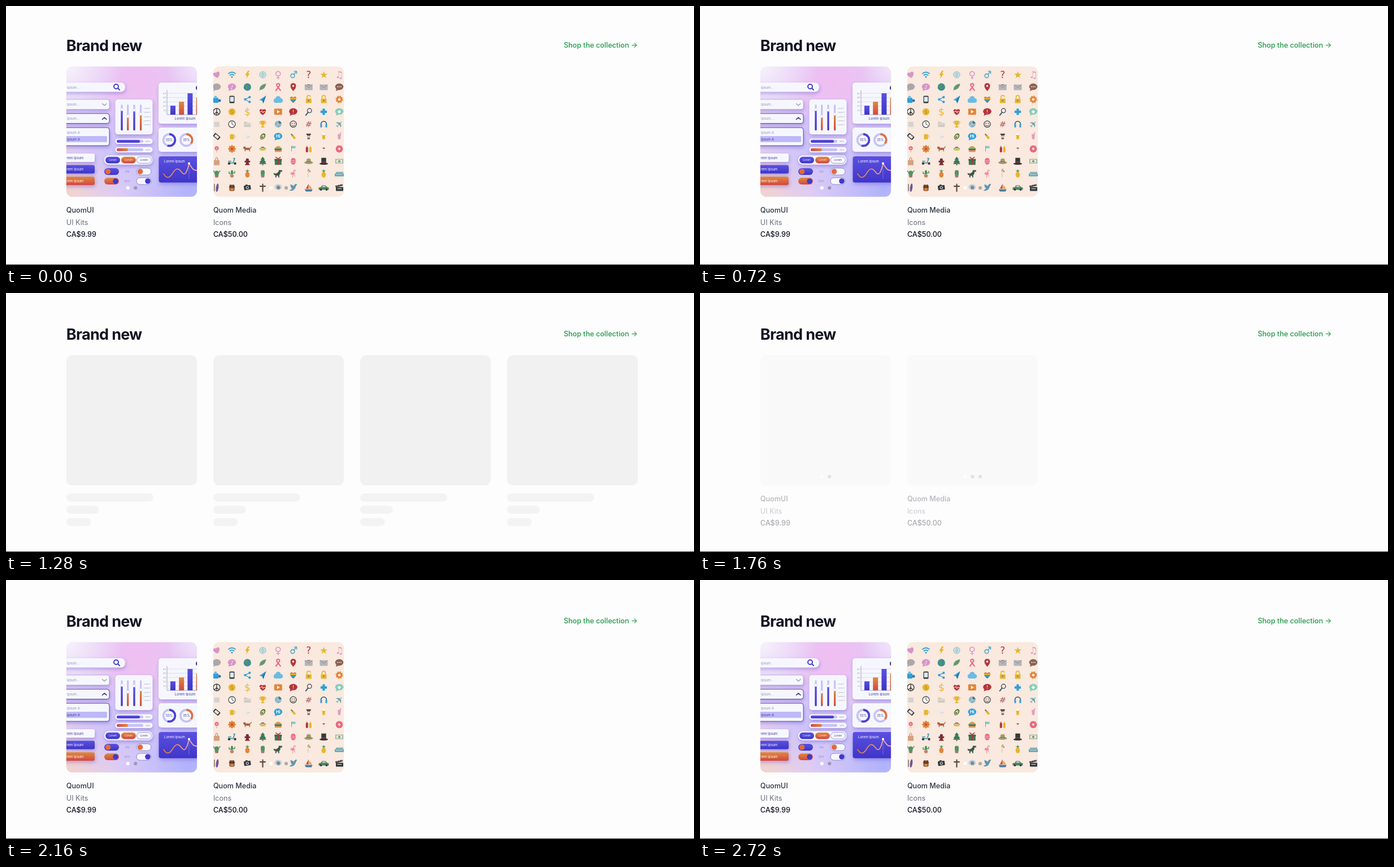
These frames come from a looping animation (1218 by 460 pixels, 2.8 s). An HTML page:

```html
<!DOCTYPE html>
<html lang="en">
<head>
<meta charset="utf-8">
<title>Brand new</title>
<style>
html, body { margin: 0; width: 100%; height: 100%; overflow: hidden; background: #fdfdfd; }
svg { display: block; width: 1218px; height: 460px; font-family: Inter, Roboto, sans-serif; }
#page, #bones, #cards, .photo { animation: 2800ms step-end infinite; }
#page { animation-name: shift; }
#bones { animation-name: wait; }
#cards { animation-name: appear; }
.photo { animation-name: load; }
@keyframes shift { 0% { transform: translateY(-3px); } 37.14%, 100% { transform: none; } }
@keyframes wait { 0% { opacity: 0; } 37.14% { opacity: 1; } 62.85%, 100% { opacity: 0; } }
@keyframes appear {
  0% { opacity: 1; } 37.14% { opacity: 0; } 62.85% { opacity: .35; }
  65.71% { opacity: .75; } 68.57%, 100% { opacity: 1; }
}
@keyframes load { 0% { opacity: 1; } 37.14% { opacity: 0; } 65.71%, 100% { opacity: 1; } }
.title { font-size: 27px; font-weight: 700; letter-spacing: -.025em; fill: #111322; }
.link, .info { font-size: 12.6px; font-weight: 500; }
.link { fill: #229a49; }
.lift > * { filter: drop-shadow(1px 3px 3px rgba(92, 72, 190, .38)); }
</style>
</head>
<body>
<svg id="stage" viewBox="0 0 1218 460"></svg>
<script>
const circ = (fill, r, x = 0, y = 0, ry = r) => `<ellipse cx="${x}" cy="${y}" rx="${r}" ry="${ry}" fill="${fill}"/>`;
const box = (fill, x, y, w, h, r = 0, more = '') =>
  `<rect x="${x}" y="${y}" width="${w}" height="${h}" rx="${r}" fill="${fill}" ${more}/>`;
const fig = (fill, d) => `<path d="${d}" fill="${fill}"/>`;
const line = (stroke, d, w = 1.2, more = '') =>
  `<path d="${d}" fill="none" stroke="${stroke}" stroke-width="${w}" stroke-linecap="round" stroke-linejoin="round" ${more}/>`;
const ring = (stroke, r, w = 1.2, x = 0, y = 0, more = '') =>
  `<circle cx="${x}" cy="${y}" r="${r}" fill="none" stroke="${stroke}" stroke-width="${w}" ${more}/>`;
const label = (s, x, y, size, fill, more = '') => `<text x="${x}" y="${y}" font-size="${size}" fill="${fill}" ${more}>${s}</text>`;
const mid = 'text-anchor="middle"';
const turn = (deg, s) => `<g transform="rotate(${deg})">${s}</g>`;

const left = 106.8, step = 260.1, side = 231.3, top0 = 110.5;
const cardX = i => left + i * step;
const frame = (i, fill) => box(fill, cardX(i), top0, side, side, 10.8);

// Soft background lights: id, centre, radius, colour
const lights = [
  ['pink', 235, 135, 120, '#f0bdf1'], ['pale', 107, 108, 100, '#f8f2fb'], ['corner', 345, 108, 60, '#f4e8fb'],
  ['peach', 105, 335, 105, '#f3d3cc'], ['blue', 325, 330, 130, '#b0b2fb'], ['lilac', 190, 260, 90, '#cdc3fa']
];
const ramp = (id, a, b, x, y) =>
  `<linearGradient id="${id}" x1="0" y1="0" x2="${x}" y2="${y}"><stop stop-color="${a}"/><stop offset="1" stop-color="${b}"/></linearGradient>`;
const defs = `<defs>${lights.map(([id, x, y, r, c]) =>
  `<radialGradient id="${id}" gradientUnits="userSpaceOnUse" cx="${x}" cy="${y}" r="${r}">
    <stop stop-color="${c}"/><stop offset="1" stop-color="${c}" stop-opacity="0"/></radialGradient>`).join('')}
  ${ramp('ink', '#5a50e0', '#3f35c8', 0, 1)}${ramp('warm', '#df8a3e', '#d2473f', 0, 1)}
  ${ramp('warmX', '#d2473f', '#e08a3c', 1, 0)}${ramp('wave', '#e2783f', '#f0b9c4', 1, 0)}
  ${[0, 1].map(i => `<clipPath id="clip${i}">${frame(i, '#000')}</clipPath>`).join('')}</defs>`;

function kitArt() {
  const white = '#f6f7fe', ink = 'url(#ink)', warm = 'url(#warm)', grey = '#9493b3', dark = '#453b9b', track = '#c6c2f4';
  const edge = `stroke="${dark}" stroke-width=".9"`;
  const slider = (x, y, c) => box(track, x - 1.6, 178, 3.2, 46, 1.6) + box(c, x - 1.6, y, 3.2, 224 - y, 1.6) +
    circ('#fff', 2.4, x, y) + ring('#b9b5dc', 2.4, .4, x, y);
  const progress = (y, w, c, s) => box(track, 196, y + 2.5, 47, 5, 2.5) + box(c, 196, y + 2.5, w, 5, 2.5) + label(s, 247, y + 6.6, 4, grey);
  const donut = (x, v, c) => ring(track, 10.4, 3.6, x, 241) +
    ring(c, 10.4, 3.6, x, 241, `pathLength="100" stroke-dasharray="${v} 100" transform="rotate(-90 ${x} 241)"`) +
    label(v + '%', x, 243, 5.6, dark, mid);
  const toggle = (x, y, fill, knob, on) => box(fill, x, y, 26, 12, 6, fill === white ? `stroke="${dark}" stroke-width=".5"` : '') +
    circ(knob, 4.8, x + (on ? 20 : 6.5), y + 6);
  const pill = (x, fill, text, more) => box(fill, x, 270.8, 26, 11.6, 5.8, more) + label('Lorem', x + 13, 278.3, 4.6, text, mid);

  return box('#dfcdf7', 106, 110, 233, 233) + lights.map(l => box(`url(#${l[0]})`, 106, 110, 233, 233)).join('') +
    '<g class="lift">' +
      box(white, 90, 139, 121, 16.5, 8) + box(white, 90, 169, 93, 17.5, 4, 'stroke="#a39fca" stroke-width=".6"') +
      box(white, 90, 194, 93, 17.5, 4, edge) + box(white, 90, 219, 93, 32, 4, edge) +
      box(white, 193.5, 169, 66, 62, 5) + box(white, 193.5, 238.5, 66, 9.6, 4.8) + box(white, 193.5, 253.5, 66, 9.6, 4.8) +
      box(white, 270, 139, 90, 73, 5) + box(white, 270, 219, 90, 43, 5) + box(ink, 270.5, 270, 90, 46.5, 4) +
      box(white, 90, 265, 67, 15, 3) + box(ink, 90, 285.5, 67, 15, 3) + box(warm, 90, 306, 67, 15, 3) +
      box(white, 174, 268.5, 85.5, 16.2, 8) +
    '</g>' +
    [150, 180.3, 205.3].map(y => label('ipsum...', 108, y, 6, grey)).join('') +
    ring('#4338c6', 4, 1.9, 195, 146) + line('#4338c6', 'M198 149l3 3', 2) +
    line(grey, 'M170.5 176.5l3.7 3.3l3.7-3.3') + line('#3c3485', 'M170.5 204.3l3.7-3.3l3.7 3.3', 1.6) +
    box('#bdb9f7', 100, 234, 79, 10.8, 1.5) + label('ipsum A', 108, 229.6, 6, grey) + label('ipsum A', 108, 241.5, 6, dark) +
    slider(205, 187, ink) + slider(215.7, 199, warm) + slider(227, 188, ink) + slider(238.6, 195, warm) +
    [1, 2, 3, 4, 5].map(i => label('Lorem ' + i, 244, 178.8 + 7.3 * i, 3.1, grey)).join('') +
    progress(238.3, 41, ink, '98%') + progress(253.3, 20, 'url(#warmX)', '35%') +
    [50, 40, 30, 20, 10].map((n, i) => line('#c3c1dc', `M285 ${158 + 7.6 * i}h60`, .5) + label(n, 283, 159.6 + 7.6 * i, 4, grey, 'text-anchor="end"')).join('') +
    line(grey, 'M285 153v43h60', .8) +
    [180, 173, 158, 166].map((y, i) => box(i % 2 ? warm : ink, 291 + 15.2 * i, y, 9, 196 - y)).join('') +
    circ('#3c3485', 4, 340, 148.5) + label('Lorem Ipsum', 317, 205.3, 6, dark, mid) +
    donut(289, 55, '#4a40d2') + donut(319.3, 35, '#dc733f') +
    label('Lorem Ipsum', 280, 280.8, 6, '#fff') +
    line('url(#wave)', 'M279 301C285 311 290 308 295 300S304 289 310 297S319 303 324 283C329 289 331 298 342 294', 1.7) +
    line('#a9a3f3', 'M324 283v27', .5) + circ('#fff', 2, 324, 282.5) +
    [dark, '#fff', '#fff'].map((c, i) => label('rem Ipsum', 107.5, 274.6 + 20.5 * i, 6, c)).join('') +
    pill(176, ink, '#fff') + pill(204, warm, '#fff') + pill(231.3, white, dark, `stroke="${dark}" stroke-width=".5"`) +
    toggle(174, 291, ink, '#df6b3f', 0) + toggle(231, 291, white, '#df6b3f', 0) +
    toggle(174, 308, warm, '#4338cc', 1) + toggle(231, 308, white, '#4338cc', 1) +
    label('ON', 214.5, 299, 5.4, grey, mid) + label('OFF', 214.5, 316, 5.4, grey, mid);
}

function iconArt() {
  const red = '#b5343a', blue = '#309fd8', sky = '#6cbbe4', gold = '#e6b62e', pink = '#d795c8', rose = '#ee6a86',
    black = '#35383b', grey = '#aaa7a9', pale = '#d5d2ce', brown = '#8a6250', green = '#4f9465', orange = '#e2843a', teal = '#5f9fac', tan = '#d6a17f';
  const sign = (c, ch, size = 15) =>
    label(ch, 0, size * .36, size, c, `${mid} font-family="'DejaVu Sans', sans-serif"`);
  const heartPath = 'M0 6C-10-1-5-7.5 0-3.5C5-7.5 10-1 0 6z';
  const bubble = c => circ(c, 7.3, 0, -.6, 5.8) + fig(c, 'M-5 2l-1 5l5-2z');
  const plus = (c, s) => line(c, `M0-${s}v${2 * s}M-${s} 0h${2 * s}`, s * .75, 'style="stroke-linecap:butt"');
  const lock = d => line(gold, d, 1.6) + box(gold, -5, -1.5, 10, 8, 1) + circ(brown, 1.2, 0, 2);
  const mail = box('#b3b5ba', -7, -4.5, 14, 10, 1) + line('#7f858d', 'M-6.5-4l6.5 5l6.5-5', .8);
  const pot = (c, s = '') => fig(c, 'M-3.5 2h7l-1 5h-5z') + s;
  const cactus = box(green, -2, -6, 4, 8, 2) + line(green, 'M-5-3v3h3M5-4v3h-3', 1.5);
  const pineapple = c => circ(c, 3.8, 0, 2, 5) + fig(green, 'M0-2l-4-4l3 1l1-3l1 3l3-1z');
  const glass = c => fig(c, 'M-3-4h6l-1 9h-4z');
  const tree = '#377b57';

  const rows = [
    [turn(-18, fig(pink, heartPath)),
     line(blue, 'M-6-2Q0-7 6-2M-3.5 1Q0-2 3.5 1', 1.8) + circ(blue, 1.6, 0, 4),
     fig(gold, 'M1-7l-5 8h3l-1 6l6-9h-3l3-5z'),
     ring('#78bcd3', 5.6, 1) + ring('#78bcd3', 2.6, .7) + line('#78bcd3', 'M-5 0h10M0-5v10M-4-3h8M-4 3h8', .7),
     sign(pink, '♀', 17), turn(0, ring('#4fa7d2', 3.4, 1.6, -1, 2) + line('#4fa7d2', 'M1.5-.7l4-5M2-6h4v4', 1.5)),
     sign(red, '?', 17), sign(gold, '★', 17), sign(pink, '♫', 17)],
    [bubble(grey), bubble(pink) + sign('#fff', '♪', 9),
     circ('#3987a9', 6.6) + fig(green, 'M-5-3Q-1-8 2-5L0-1L3 2L-1 6Q-2 1-5 0zM3-2l3 0l-1 5z'),
     fig('#6b9b73', 'M6-6C-3-5-7 1-5 5C1 5 5 1 6-6z') + line('#477a55', 'M-6 6L3-3', .7),
     line(rose, 'M-4 6L2-2Q4-6 0-6Q-4-6-2-2L4 6', 2.2),
     fig(red, 'M0 7C-8-1-5-7 0-7S8-1 0 7z') + circ('#fbe9df', 1.9, 0, -2),
     box('#e9e7e5', -4, -6, 8, 8) + mail + line(red, 'M-2-4h4', 1), mail,
     bubble(brown) + [-3, 0, 3].map(x => circ('#fff', .9, x, -.6)).join('')],
    [box(blue, -6, -3, 9, 9, 1) + circ(sky, 2.5, -2, -4) + circ('#3778a6', 2.5, 5, 2),
     box(black, -4.5, -6.5, 9, 13, 1.5) + box('#dcebf0', -3.3, -4.5, 6.6, 8.5),
     line(blue, 'M4-4L-4 0L4 4.5', 1.2) + circ(blue, 2.1, 4, -4) + circ(blue, 2.1, -4) + circ(blue, 2.1, 4, 4.5),
     fig(blue, 'M6-7L-6 1l5 1l2 5z') + fig('#1d78ad', 'M6-7L-1 2l2 5z'),
     circ(sky, 4, -4, 2) + circ(sky, 4.8, 0, -1) + circ(sky, 3.8, 4.5, 2) + box(sky, -4, 1, 9, 5),
     `<clipPath id="love"><path d="${heartPath}"/></clipPath><g clip-path="url(#love)">` +
       [red, orange, gold, green, blue, '#7b4f9e'].map((c, i) => box(c, -8, -6 + 2 * i, 16, 2.1)).join('') + '</g>',
     lock('M-3-2v-2Q-3-7 0-7Q3-7 3-5'), lock('M-3-2v-2Q-3-7 0-7T3-4v2'),
     ring(orange, 3.9, 3) + ring(orange, 5.7, 1.8, 0, 0, 'stroke-dasharray="2.4 2.08"')],
    [ring(black, 6, 1.4) + line(black, 'M0-6V6M0 0l-4 4M0 0l4 4', 1.3),
     circ(gold, 6.2) + sign('#b98620', '$', 9), sign(gold, '$', 17),
     fig(red, heartPath) + line('#fff', 'M-6 0h3l1.500-2l2 4l1.500-3l1 1h3', .9),
     box(orange, -7, -5.5, 14, 11, 1.5) + fig('#fff', 'M-2-3l5 3l-5 3z'),
     bubble(red) + sign('#fff', '!', 9), ring('#44566a', 3.8, 1.4, 1.5, -2) + line('#44566a', 'M-1 1l-4 5', 2),
     plus(blue, 5.6), bubble('#8bcbb8') + plus('#fff', 2.8)],
    [box(pale, -4, -4, 9, 9, 2) + ring(pale, 2.4, 1.2, -5), circ('#fff', 6) + ring(black, 6, 1.2) + line(black, 'M0-4v4l3 2', 1),
     fig('#cfc9c0', 'M-6-4h5l1 2h6v7h-12z') + line('#e4e1db', 'M-5 0h10', 1.5),
     fig(gold, 'M-4-6h8q0 7-3 8v2h2v2h-6v-2h2v-2q-3-1-3-8z') + line(gold, 'M-4-4h-2q0 4 3 4M4-4h2q0 4-3 4', 1),
     circ('#88b5c8', 6) + fig('#4f7888', 'M0 0V-6A6 6 0 0 1 6 0z') + line('#fbe9df', 'M0-6V0h6M0 0l-4 4', .8),
     ring(black, 5.6, 1.2) + circ(black, .9, -2, -1.500) + circ(black, .9, 2, -1.5) + line(black, 'M-3 1.500Q0 5 3 1.500', 1),
     turn(10, sign('#a5535b', '#', 14)),
     line('#2b4d68', 'M-5 2v-2A5 5 0 0 1 5 0v2', 1.4) + box(blue, -6, 0, 3, 6, 1) + box(blue, 3, 0, 3, 6, 1),
     turn(-45, sign(teal, '✈', 17))],
    [turn(40, box(black, -6, -3.5, 12, 7, 1) + box('#e9e5df', -4, -2.3, 8, 4.6)), box(gold, -3.500, -4, 7, 9, 1) + ring(gold, 2, 1, 4),
     circ('#e9ebea', 4, 0, 1, 3) + circ('#e9ebea', 2.3, -3, -2) + line('#c2c9c9', 'M-1 2l5-2', 1),
     turn(35, circ('#41633c', 4, 0, 0, 6) + circ('#cbd383', 2.8, 0, .5, 4.6) + circ(brown, 1.7, 0, 2)),
     bubble(blue) + label('Hi', 0, 2, 7.5, '#fff', mid + ' font-weight="700"'),
     turn(-40, box(gold, -2, -3, 4, 8, 1) + box('#68745e', -1, -6, 2, 4)),
     glass(brown) + box(black, -4, -5, 8, 2) + box('#e2d4c2', -2.6, -1, 5.2, 3), glass(gold) + circ('#fff', 3, 0, -4, 1.5),
     glass('#dfa0c1') + line('#ca6d9b', 'M1-4l2-3', 1)],
    [circ(rose, 3.6, 0, -1) + circ('#f2b5ae', 1.5, 0, -1) + line(tan, 'M0 2v4', 1),
     [0, 45, 90, 135].map(a => turn(a, circ(orange, 7, 0, 0, 2.6))).join('') + circ('#c8523b', 2.2),
     box('#a9643e', -5, -2, 10, 4, 2) + circ('#a9643e', 2.3, -5, -2) + line('#a9643e', 'M-4 1v3M4 1v3M5-1l2-3', 1.3),
     fig(gold, 'M-5 3Q0-5 5 3z') + line(green, 'M-5 0Q0-5 5 0', 1.4) + line(red, 'M-2-3h4', 1),
     fig('#d89848', 'M-6-1Q0-9 6-1z') + box(green, -6.500, -1, 13, 2) + box('#6f4230', -6, .8, 12, 2) + box('#d89848', -6, 3, 12, 2.6, 1),
     fig('#8bc1cc', 'M-3-5h7v4h-7z') + line(rose, 'M-3-5v9', 1),
     box(red, -5, -3, 4, 9, 1) + box(gold, 1, -3, 4, 9, 1) + fig(red, 'M-4-3l1-3l1 3z') + fig(gold, 'M2-3l1-3l1 3z'),
     fig('#6a3340', 'M-2.500-2h5q-2 4-5 0z') + line(pale, 'M0 0v4', .8), ring('#e75d78', 4.2, 4.2) + ring('#f3a0a7', 4.200, .6)],
    [box(tan, -5, -2, 10, 9, 1) + line('#b47b5a', 'M-2-2q0-5 2-5t2 5', 1),
     line(teal, 'M-6 3h8l3-8h-2M-6 0h4', 2) + circ(black, 2.2, -5, 4) + circ(black, 2.2, 5.500, 4),
     box('#792e35', -2.500, -5, 5, 11, 1.5) + box('#792e35', -5, -1, 10, 3, 1) + box('#792e35', -4, 5, 8, 2),
     fig(tree, 'M0-8l4 5h-2l4 5h-2l2.500 3h-13l2.500-3h-2l4-5h-2z') + box(brown, -1, 5, 2, 2.500),
     box(tree, -6, -2, 12, 8.500) + box('#2a6750', -6.5, -4, 13, 3) + box(red, -1.2, -4, 2.4, 10.500) + line(red, 'M0-4l-4-3M0-4l4-3', 1.6),
     circ(rose, 4.600, 0, 0, 6) + line('#f5b5c0', 'M-4-1h8M-4 2h8', 1),
     circ('#a09b72', 7.500, 0, 2.5, 2.600) + circ('#a09b72', 4, 0, -1, 4) + line(brown, 'M-4 1h8', 1),
     box(black, -4.2, -6, 8.4, 11) + circ(black, 7.500, 0, 4.5, 1.9) + line(red, 'M-4 1.500h8', 1.2),
     box('#9caf95', -7, -4, 14, 8) + box('#e4e8d6', -5.500, -2.800, 11, 5.600) + circ('#79917a', 2)],
    [pot('#9b7465', circ(green, 4, 0, -1) + line(green, 'M-3-1l-3-4M3-1l3-4', 1.5)), pot('#c08363', cactus),
     pineapple(orange), pot('#a07b70', box(green, -3.500, -6, 7, 9, 3)),
     fig('#3d5849', 'M-8-1Q-3 2 1-4v-2h6v3h-3v3l-2 3v4h-2v-3h-3v3h-2v-4q-3 0-3-3z'),
     line('#f1929f', 'M4-5q-3-3-3 1t-2 4', 1.500) + circ('#f1929f', 3.800, -1, 0, 2.500) + line('#e87b8d', 'M-1 2v5M1 2l2 3', .8),
     circ(gold, 1.500, -1, -5) + circ(rose, 1.500, 2, -4) + circ(sky, 1.500, 0, -7) + line(grey, 'M0-3q-2 4-1 9', .6),
     pineapple(gold), box(teal, -8, 0, 16, 5, 1) + box('#7fb2ba', -6, -3, 13, 3) + line('#d8e7e5', 'M-6 2h12', 1)],
    [turn(8, circ('#6b5796', 2.200, 1, 0, 7.500)) + line('#6b4c3a', 'M-4-6v12', 1.2),
     box('#7a482d', -4.500, -5, 9, 11, 2) + box(orange, -3, 1, 6, 4, 1) + line('#4f2f22', 'M-5-1h10M-3-5v4M3-5v4', 1),
     turn(-8, box(black, -6, -4, 12, 8, 1) + circ('#d8d9d7', 2.600) + circ(black, 1.500) + box(black, -3, -5.500, 4, 3)),
     line('#5d4a3e', 'M0-6V6.500M-4.500-2.500h9', 2.200), circ('#bed3dc', 6.500, 0, -1, 5) + circ('#8aa7b6', 3, 0, -1),
     fig('#6396b1', 'M7-6Q3-8 1-3L-5-6Q-5 0-2 2L-7 5Q2 8 5-3z'),
     fig('#c65343', 'M0-7v9h-5z') + fig('#e2a044', 'M1-5v7h5z') + fig('#477da2', 'M-7 3h14l-2 4h-10z'),
     fig('#4f8460', 'M-9 0l4-1l2-3h6l3 3l3 1v4h-18z') + fig('#cce0df', 'M-3-1l1-2h4l2 2z') + circ(black, 1.900, -5, 3.500) + circ(black, 1.900, 5, 3.500),
     box(black, -6, -1, 13, 7, 1) + turn(-14, box(black, -6, -5, 13, 3)) + line('#eee', 'M-4-3l2-2M0-4l2-2M4-5l2-2M-3 2h7', 1)]
  ];
  const xs = [373, 400, 427.3, 454.5, 481.800, 508.500, 535.800, 562.500, 590];
  return box('#f9e9de', 366, 110, 234, 233) + rows.map((row, r) => row.map((icon, c) =>
    `<g transform="translate(${xs[c]} ${125 + 21.950 * r + (r === 9 ? 3 : 0)})">${icon}</g>`).join('')).join('');
}

function card(i, art, name, kind, price, dots) {
  const text = (s, y, fill, weight) => label(s, cardX(i), y, 12.6, fill, `class="info" style="font-weight:${weight}"`);
  const x0 = cardX(i) + side / 2 - 6.750 * (dots - 1);
  const marks = Array.from({ length: dots }, (_, k) => circ(k ? 'rgba(95,90,100,.45)' : '#fff', 3.1, x0 + 13.5 * k, 326));
  return frame(i, '#f1f1f1') + `<g clip-path="url(#clip${i})"><g class="photo">${art}</g></g>` + marks.join('') +
    text(name, 370, '#2c3442', 500) + text(kind, 391.700, '#6b6f7b', 400) + text(price, 413.300, '#111322', 500);
}

const bones = [0, 1, 2, 3].map(i => frame(i, '#f1f1f1') +
  [154.2, 57.8, 43.4].map((w, k) => box('#f3f3f3', cardX(i), 356 + 21.7 * k, w, 14.4, 7.2)).join('')).join('');

document.getElementById('stage').innerHTML = defs + `<g id="page">
  <text class="title" x="106.8" y="82.600">Brand new</text>
  <text class="link" x="1118.400" y="77.200" text-anchor="end">Shop the collection →</text>
  <g id="bones">${bones}</g>
  <g id="cards">${card(0, kitArt(), 'QuomUI', 'UI Kits', 'CA$9.99', 2)}${card(1, iconArt(), 'Quom Media', 'Icons', 'CA$50.00', 3)}</g>
  </g>` + box('#303036', 0, 459, 1218, 1);
</script>
</body>
</html>
```
